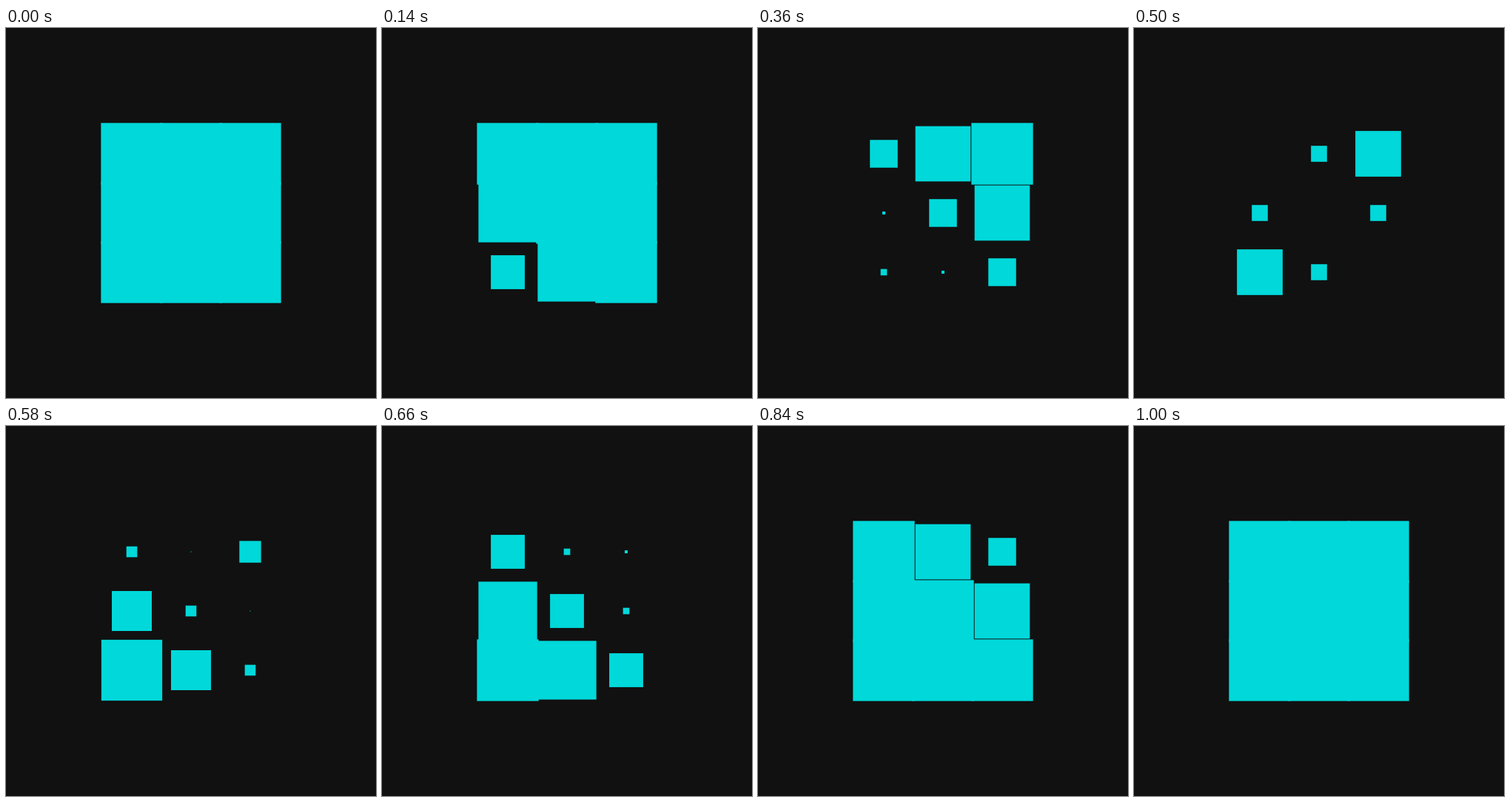
Animation of 500x500 px, one loop 2.02 s. Source, as an HTML page:

```html
<!DOCTYPE html>
<html lang="en">
<head>
<meta charset="utf-8">
<title>Cube grid</title>
<style>
  html, body { margin: 0; width: 100%; height: 100%; overflow: hidden; background: #111; }
  svg { display: block; width: 100%; height: 100%; }
</style>
</head>
<body>
<svg id="stage" viewBox="0 0 500 500" fill="#00d8da"></svg>
<script>
  const LOOP = 2020;      // ms
  const HALF = 300;       // time to shrink, and again to grow
  const STAGGER = 100;    // delay between diagonals
  const SIZE = 250 / 3;
  const PITCH = 80;

  const stage = document.getElementById('stage');
  const cells = [];

  for (let row = 0; row < 3; row++) {
    for (let col = 0; col < 3; col++) {
      const rect = document.createElementNS('http://www.w3.org/2000/svg', 'rect');
      stage.appendChild(rect);
      cells.push({
        rect,
        x: 250 + (col - 1) * PITCH,
        y: 250 + (row - 1) * PITCH,
        // The wave runs from bottom left to top right.
        low: HALF + (col + 2 - row) * STAGGER
      });
    }
  }

  const smoothstep = p => p * p * (3 - 2 * p);

  function draw(t) {
    for (const { rect, x, y, low } of cells) {
      const size = SIZE * smoothstep(Math.min(1, Math.abs(t - low) / HALF));
      rect.setAttribute('x', x - size / 2);
      rect.setAttribute('y', y - size / 2);
      rect.setAttribute('width', size);
      rect.setAttribute('height', size);
    }
  }

  let start;
  function tick(now) {
    start ??= now;
    draw((now - start) % LOOP);
    requestAnimationFrame(tick);
  }

  draw(0);
  requestAnimationFrame(tick);
</script>
</body>
</html>
```
